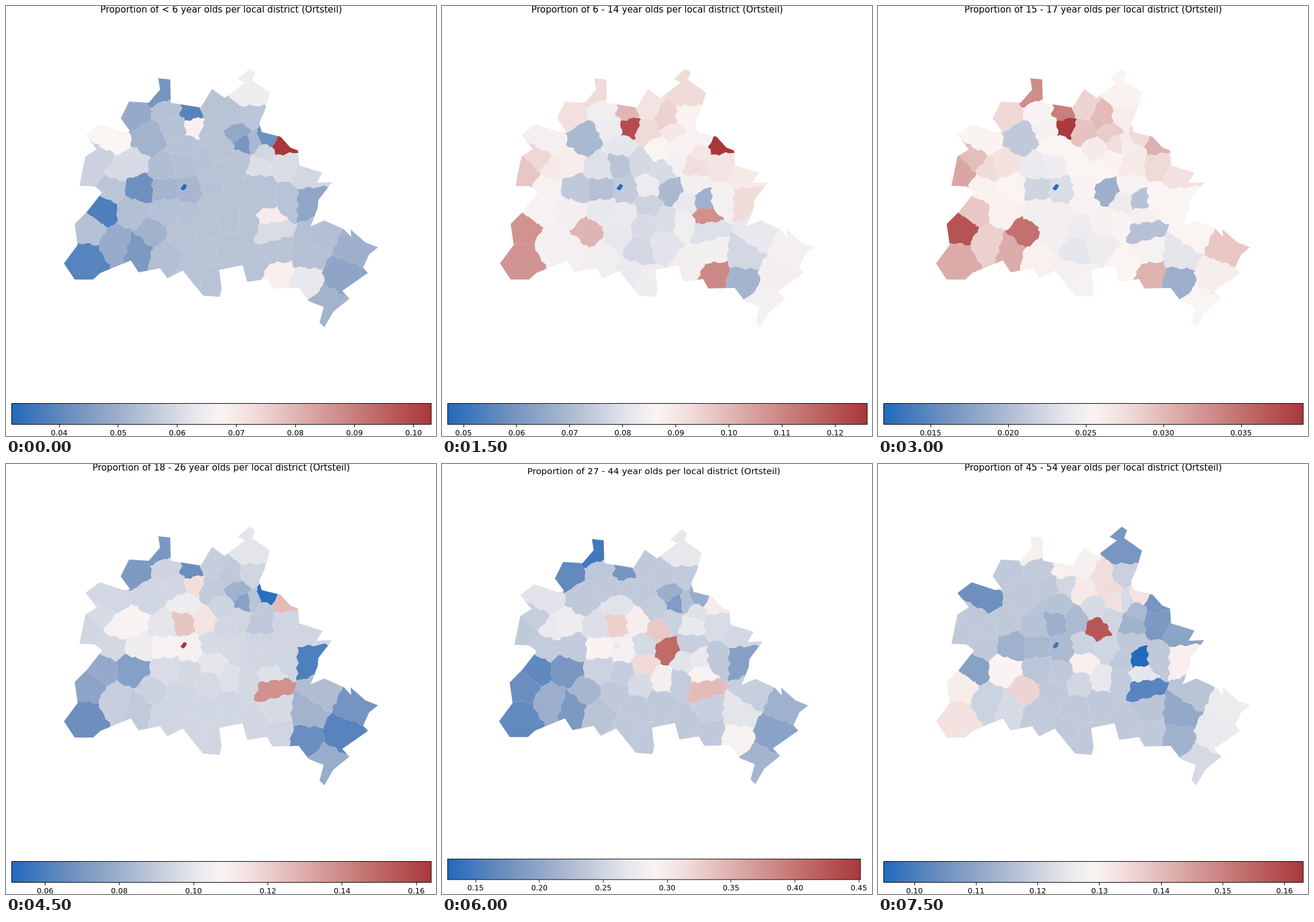
Write an HTML page that moves like this. It is 720 by 720 pixels and loops after 8000 ms.

```html
<!DOCTYPE html>
<html lang="en">
<head>
<meta charset="utf-8">
<title>District map</title>
<style>
html, body { margin: 0; width: 100%; height: 100%; overflow: hidden; background: #fff; }
svg { display: block; width: 100vw; height: 100vh; }
text { font-family: "DejaVu Sans", sans-serif; font-size: 12.6px; text-anchor: middle; }
#title { font-size: 15.2px; }
</style>
</head>
<body>
<svg viewBox="0 0 720 720">
  <defs>
    <linearGradient id="ramp"></linearGradient>
    <clipPath id="city"><path d="M239 162 258 140 255 121 275 123 276 162 326 170 345 139 366 154 400 128 388 122 408 105 417 111 412 124 442 145 433 176 424 196 428 211 460 219 476 237 489 242 491 267 530 279 520 296 546 295 523 325 522 338 510 369 533 359 566 374 578 387 577 374 602 396 623 404 608 416 598 438 606 447 563 477 575 490 548 512 533 538 525 530 532 504 507 494 490 472 446 473 437 457 404 462 396 434 357 442 361 474 358 487 330 485 296 443 270 456 258 439 222 446 209 426 158 447 146 458 115 458 97 431 120 400 115 365 136 344 161 312 148 302 123 301 133 252 152 240 133 216 157 198 196 211 208 210 192 188 206 160Z"/></clipPath>
  </defs>
  <g id="stage">
    <text id="title" x="360.3" y="11"></text>
    <g id="map" clip-path="url(#city)"></g>
    <rect x="9.5" y="665.5" width="702.5" height="35" fill="url(#ramp)" stroke="#000"/>
    <g id="axis"></g>
  </g>
</svg>
<script>
const $ = id => document.getElementById(id);

function add(parent, tag, attrs, text = '') {
  const el = document.createElementNS('http://www.w3.org/2000/svg', tag);
  for (const key in attrs) el.setAttribute(key, attrs[key]);
  el.textContent = text;
  return parent.appendChild(el);
}

// Diverging colour scale, positions 0..100
const stops = [
  [0, '#2369bd'], [14.3, '#6e90bf'], [28.6, '#aab8d0'], [42.9, '#e4e5eb'], [50, '#faf4f3'],
  [57.1, '#f2dfdd'], [71.4, '#d9a6a4'], [85.7, '#c26f6d'], [100, '#a9373b']
];
for (const [at, color] of stops) add($('ramp'), 'stop', { offset: at + '%', 'stop-color': color });

function shade(v) {
  const i = Math.max(1, stops.findIndex(s => s[0] >= v));
  const [[a, from], [b, to]] = [stops[i - 1], stops[i]];
  const channel = (hex, c) => parseInt(hex.substr(1 + 2 * c, 2), 16);
  const mix = c => channel(from, c) + (channel(to, c) - channel(from, c)) * (v - a) / (b - a);
  return `rgb(${[0, 1, 2].map(c => Math.round(mix(c)))})`;
}

// Each district is the ground nearest to its centre.
const centres = `
  259,143 212,182 238,222 274,175 286,203 310,179 314,200 300,235 344,170 342,210 378,187
  408,148 408,186 389,210 401,231 414,230 437,222 463,233 432,243 424,268 392,258 362,241
  180,227 163,258 142,278 184,273 210,265 266,273 176,303 224,306
  297,265 332,262 267,305 309,308 344,303 368,275 383,310 423,300 412,329 436,326 440,352
  467,264 504,283 468,325 508,326
  160,343 140,371 133,426 186,397 212,343 222,408 245,382 266,417
  294,385 270,343 306,351 346,333 338,367 375,360 405,362 331,409 371,400 317,448 346,463
  416,433 443,375 452,410 455,450 500,462 505,415 527,382 582,404 564,452 537,500
`.trim().split(/\s+/).map(p => p.split(',').map(Number));

// The part of a polygon that lies nearer to p than to q
function nearer(polygon, p, q) {
  const side = ([x, y]) => (x - (p[0] + q[0]) / 2) * (q[0] - p[0]) + (y - (p[1] + q[1]) / 2) * (q[1] - p[1]);
  return polygon.flatMap((a, i) => {
    const b = polygon[(i + 1) % polygon.length], sa = side(a), sb = side(b);
    const kept = sa <= 0 ? [a] : [];
    if (sa * sb < 0) kept.push(a.map((v, c) => v + (b[c] - v) * sa / (sa - sb)));
    return kept;
  });
}

// Bends straight borders; depends on position only, so neighbours still meet.
const wobble = ([x, y]) => [
  x + 1.6 * Math.sin(y * .33 + x * .05) + .8 * Math.sin(y * .9),
  y + 1.6 * Math.sin(x * .29 + y * .07) + .8 * Math.sin(x * .8)
];

function winding(polygon) {
  return polygon.flatMap((a, i) => {
    const b = polygon[(i + 1) % polygon.length];
    const steps = Math.ceil(Math.hypot(b[0] - a[0], b[1] - a[1]) / 5);
    return Array.from({ length: steps }, (_, k) => wobble(a.map((v, c) => v + (b[c] - v) * k / steps)));
  });
}

const toPath = points => `M${points.map(p => p.map(v => v.toFixed(1)).join(' ')).join('L')}Z`;
const box = [[80, 90], [640, 90], [640, 555], [80, 555]];
const districts = centres.map(at => {
  const cell = centres.reduce((poly, other) => other === at ? poly : nearer(poly, at, other), box);
  return { at, el: add($('map'), 'path', { d: toPath(winding(cell)) }) };
});
districts.push({ at: [297, 303], el: add($('map'), 'path', { d: 'M292 306 298 298 303 300 301 305 297 309Z' }) });

// Neighbourhoods that stand out: x, y, reach
const places = {
  neck: [259, 143, 18], heath: [212, 182, 18], lake: [245, 215, 28], brook: [310, 179, 10],
  towers: [314, 200, 9], meadow: [360, 195, 32], crest: [408, 146, 24], garden: [397, 222, 14],
  farm: [437, 222, 11], gate: [463, 233, 9], blocks: [428, 258, 20], heights: [485, 270, 26],
  ridge: [510, 325, 18], zoo: [436, 326, 11], track: [440, 352, 12], hill: [368, 275, 18],
  market: [388, 315, 20], works: [312, 263, 26], core: [297, 303, 6], centre: [285, 303, 30],
  canal: [360, 340, 26], weir: [443, 380, 18], orchard: [453, 446, 15], lido: [500, 462, 15],
  woods: [512, 412, 32], cape: [575, 400, 40], bend: [555, 470, 38], spit: [180, 225, 18],
  isle: [198, 268, 24], border: [150, 270, 22], ford: [160, 342, 12], bank: [140, 371, 18],
  shore: [133, 426, 28], park: [215, 400, 34], manor: [245, 381, 13], forest: [212, 343, 18],
  avenue: [224, 308, 18], south: [335, 400, 45]
};

// ticks: first label, label step, decimals, first x, x step, count
// base: usual scale position; peaks: how far a place departs from it
const scenes = [
  { ages: '< 6', ticks: [.04, .01, 2, 89, 98.9, 7], base: 32, peaks: {
    neck: -16, heath: -8, lake: -6, brook: -22, towers: 20, crest: 15, garden: -26, farm: -18, gate: 68,
    blocks: 12, heights: 14, ridge: -10, track: 20, core: -31, centre: -7, weir: 8, orchard: 22, lido: 14,
    cape: -6, bend: -12, spit: 18, isle: 10, border: 6, ford: -24, shore: -22, park: -16, avenue: -18 } },
  { ages: '6 - 14', ticks: [.05, .01, 2, 36, 88.9, 8], base: 48, peaks: {
    neck: 10, heath: 10, lake: -22, brook: 18, towers: 44, meadow: 18, crest: 10, gate: 52, blocks: 12,
    heights: 12, ridge: 10, zoo: -22, track: 30, hill: -8, market: -20, works: -16, core: -30, centre: -24,
    canal: -14, weir: -8, orchard: 34, lido: -20, woods: -10, isle: 6, border: 20, bank: 28, shore: 28,
    manor: 20, avenue: -14, south: -10 } },
  { ages: '15 - 17', ticks: [.015, .005, 3, 88, 130, 5], base: 50, peaks: {
    neck: 28, heath: 10, lake: -18, brook: 30, towers: 46, meadow: 24, garden: 10, farm: 8, gate: 18,
    blocks: 5, heights: 14, zoo: -18, market: -28, core: -35, centre: -18, weir: -20, orchard: 20, lido: -24,
    woods: -8, cape: 14, isle: 8, border: 28, ford: 12, bank: 42, shore: 20, park: 22, manor: 28, south: -7 } },
  { ages: '18 - 26', ticks: [.06, .02, 2, 65.5, 124.3, 6], base: 38, peaks: {
    neck: -21, heath: -20, brook: -24, towers: 20, meadow: -6, crest: 5, garden: -28, farm: -36, gate: 28,
    blocks: -6, ridge: -30, works: 32, core: 50, centre: 16, canal: 8, weir: 42, lido: -20, woods: -10,
    cape: -22, bend: -32, isle: 16, ford: -14, bank: -16, shore: -24, park: -4, forest: -18, avenue: 8 } },
  { ages: '27 - 44', ticks: [.15, .05, 2, 57, 108.7, 7], fit: 'translate(.14 6.6) scale(.984)', base: 34, peaks: {
    neck: -28, heath: -22, brook: -18, crest: 10, garden: -26, farm: -10, gate: 18, blocks: 14, heights: 10,
    ridge: -14, zoo: 10, track: 14, hill: 28, market: 55, works: 32, centre: 24, canal: 34, weir: 34, lido: 16,
    woods: 10, cape: -8, bend: -16, spit: 8, isle: 16, ford: -22, bank: -20, shore: -22, park: -18, forest: -16 } },
  { ages: '45 - 54', ticks: [.1, .01, 2, 61, 103.3, 7], base: 34, peaks: {
    neck: 18, brook: 15, meadow: 34, crest: -18, garden: 34, farm: 22, gate: -16, blocks: -10, heights: -28,
    ridge: 18, zoo: -38, track: 12, hill: 58, works: -10, core: -22, centre: -8, canal: 26, weir: -26, lido: -8,
    woods: -12, cape: 12, bend: 12, spit: -20, ford: -14, bank: 18, shore: 22, park: 6, manor: 24, forest: 16,
    avenue: -8 } }
];

function level({ base, peaks }, [x, y]) {
  let v = base;
  for (const name in peaks) {
    const [px, py, reach] = places[name];
    v += peaks[name] * Math.exp(-((x - px) ** 2 + (y - py) ** 2) / reach ** 2);
  }
  return Math.min(100, Math.max(0, v));
}

function show(scene) {
  const [first, step, digits, x0, dx, count] = scene.ticks;
  $('stage').setAttribute('transform', scene.fit || '');
  $('title').textContent = `Proportion of ${scene.ages} year olds per local district (Ortsteil)`;
  for (const d of districts) d.el.setAttribute('fill', shade(level(scene, d.at)));
  $('axis').replaceChildren();
  for (let i = 0; i < count; i++) {
    const x = x0 + dx * i;
    add($('axis'), 'path', { d: `M${Math.round(x - .5) + .5} 701v4.4`, stroke: '#000' });
    add($('axis'), 'text', { x, y: 718.5 }, (first + step * i).toFixed(digits));
  }
}

let current;
function tick() {
  const scene = scenes[Math.floor(performance.now() % 8000 / 1500)];
  if (scene !== current) show(current = scene);
  requestAnimationFrame(tick);
}
tick();
</script>
</body>
</html>
```
